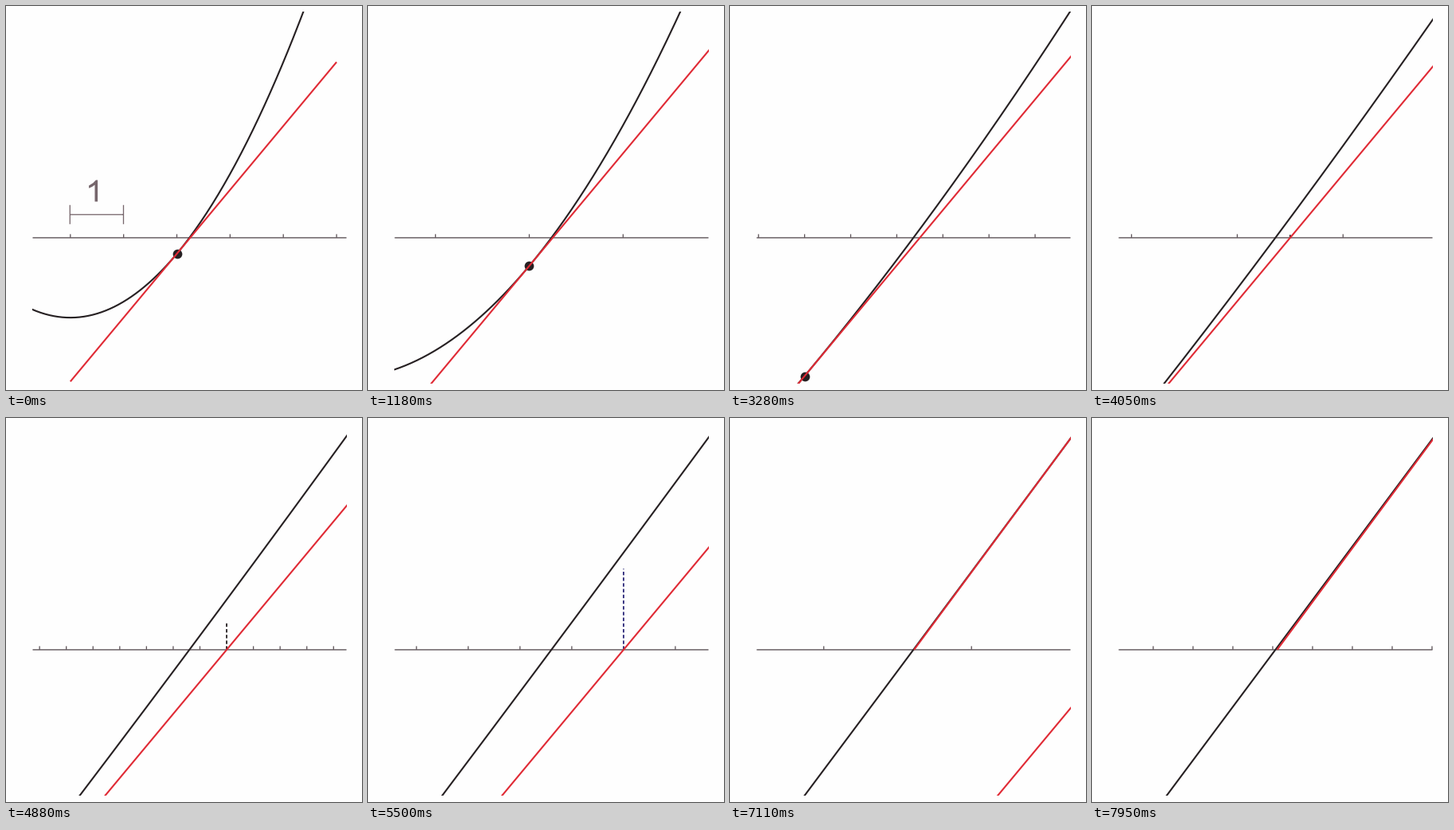
A matplotlib script that plays this animation: 447x482 px, repeating every 8000 ms.

```python
import numpy as np
import matplotlib.pyplot as plt
from matplotlib.animation import FuncAnimation
from matplotlib.patches import Polygon, Rectangle

W, H, DPI = 447, 482, 64
INTERVAL, FRAMES = 40, 200
PX = 72 / DPI                       # points per pixel

ROOT = np.sqrt(5)
CX, AXIS_Y = 229.8, 290.4           # zoom centre: the root on the axis
UNIT, RISE = 66.85, 20.05           # pixels per unit at zoom 1
LEFT, RIGHT, TOP, BOTTOM = 33, 427, 7, 473
X0, X1, X2 = 2.0, 2.25, 161 / 72    # Newton iterates of x^2 - 5

INK, RED, BLUE = "#262022", "#e02a35", "#2a2aa8"
AXIS, BAR = "#5f555a", "#76666c"

# Logarithm of the zoom over time, in seconds
ZOOM_T = [0, 0.645, 2.16, 2.83, 4.05, 4.88, 5.81, 6.50, 7.95, 8.0]
ZOOM_L = [0, 0, 1.667, 1.667, 3.0, 3.916, 4.941, 4.941, 6.653, 6.71]


def f(x):
    return x * x - 5


def ramp(t, a, b):
    return float(np.clip((t - a) / (b - a), 0, 1))


def mix(c1, c2, k):
    a, b = (np.array([int(c[i:i + 2], 16) for i in (1, 3, 5)]) / 255 for c in (c1, c2))
    return tuple(a + (b - a) * k)


fig = plt.figure(figsize=(W / DPI, H / DPI), dpi=DPI, facecolor="#fefefe")
ax = fig.add_axes([0, 0, 1, 1])
ax.set_xlim(-0.5, W - 0.5)
ax.set_ylim(H - 0.5, -0.5)
ax.axis("off")
window = Rectangle((LEFT - 0.5, TOP - 0.5), RIGHT - LEFT + 0.5, BOTTOM - TOP + 1,
                   transform=ax.transData)


def line(color, width, z, **kw):
    art, = ax.plot([], [], color=color, lw=width * PX, zorder=z, snap=False,
                   solid_capstyle="butt", dash_capstyle="butt", **kw)
    art.set_clip_path(window)
    return art


def dot():
    art, = ax.plot([], [], "o", color=INK, ms=11.7 * PX, mew=0, zorder=4, snap=False)
    art.set_clip_path(window)
    return art


base = line(AXIS, 1.4, 1)
base.set_data([LEFT, RIGHT], [AXIS_Y, AXIS_Y])
ticks = line(AXIS, 1.3, 1)
curve = line(INK, 2.1, 2)
drop = line(INK, 1.8, 3, linestyle=(0, (2.4, 1.6)))
dot0, dot1 = dot(), dot()
tangent0 = line(RED, 2.1, 5)
tangent1 = line(RED, 2.1, 5)

# Unit bar with its numeral
bar = line(BAR, 1.3, 1)
gap = np.nan
bar.set_data([79.8, 79.8, gap, 147, 147, gap, 79.8, 147],
             [249.3, 273.3, gap, 249.3, 273.3, gap, 261.3, 261.3])
one = Polygon(np.array([(8.7, 0), (11, 0), (11, 27), (7.4, 27), (7.4, 6),
                        (4, 8.4), (0, 10.2), (0, 6.9), (5.3, 3.6)]) + (103.6, 218),
              fc=BAR, ec="none", snap=False)
ax.add_patch(one)


def draw(i):
    t = i * INTERVAL / 1000
    zoom = np.exp(np.interp(t, ZOOM_T, ZOOM_L))
    scale, rise = UNIT * zoom, RISE * zoom

    def sx(x):
        return CX + (x - ROOT) * scale

    def sy(y):
        return AXIS_Y - y * rise

    step = 10.0 ** -np.floor(np.log10(scale / 20))
    lo = np.ceil((ROOT + (LEFT - CX) / scale) / step)
    hi = np.floor((ROOT + (RIGHT - CX) / scale) / step)
    marks = sx(np.arange(lo, hi + 1) * step)
    ticks.set_data(np.repeat(marks, 3),
                   np.tile([AXIS_Y, AXIS_Y - 4.5, np.nan], len(marks)))

    px = np.linspace(LEFT - 1, RIGHT + 2, 220)
    d = (px - CX) / scale
    curve.set_data(px, sy(d * (d + 2 * ROOT)))

    ends = np.array([0, 5.0])
    tangent0.set_data(sx(ends), sy(f(X0) + 2 * X0 * (ends - X0)))
    dot0.set_data([sx(X0)], [sy(f(X0))])

    grow = ramp(t, 3.73, 5.83)
    drop.set_data([sx(X1)] * 2, [AXIS_Y, sy(f(X1) * grow)])
    drop.set_color(mix(INK, BLUE, ramp(t, 4.9, 5.8)))
    drop.set_visible(grow > 0)

    dot1.set_data([sx(X1)], [sy(f(X1))])
    dot1.set_visible(grow >= 1)

    reach = ramp(t, 5.88, 6.36)
    end = X1 + (X2 - X1) * reach
    tangent1.set_data(sx(np.array([X1, end])), [sy(f(X1)), sy(f(X1) * (1 - reach))])
    tangent1.set_visible(reach > 0)

    fade = 1 - ramp(t, 0.5, 0.75)
    bar.set_alpha(fade)
    one.set_alpha(fade)
    return ()


anim = FuncAnimation(fig, draw, frames=FRAMES, interval=INTERVAL,
                     init_func=lambda: draw(0), repeat=True, repeat_delay=0)
plt.show()
```
